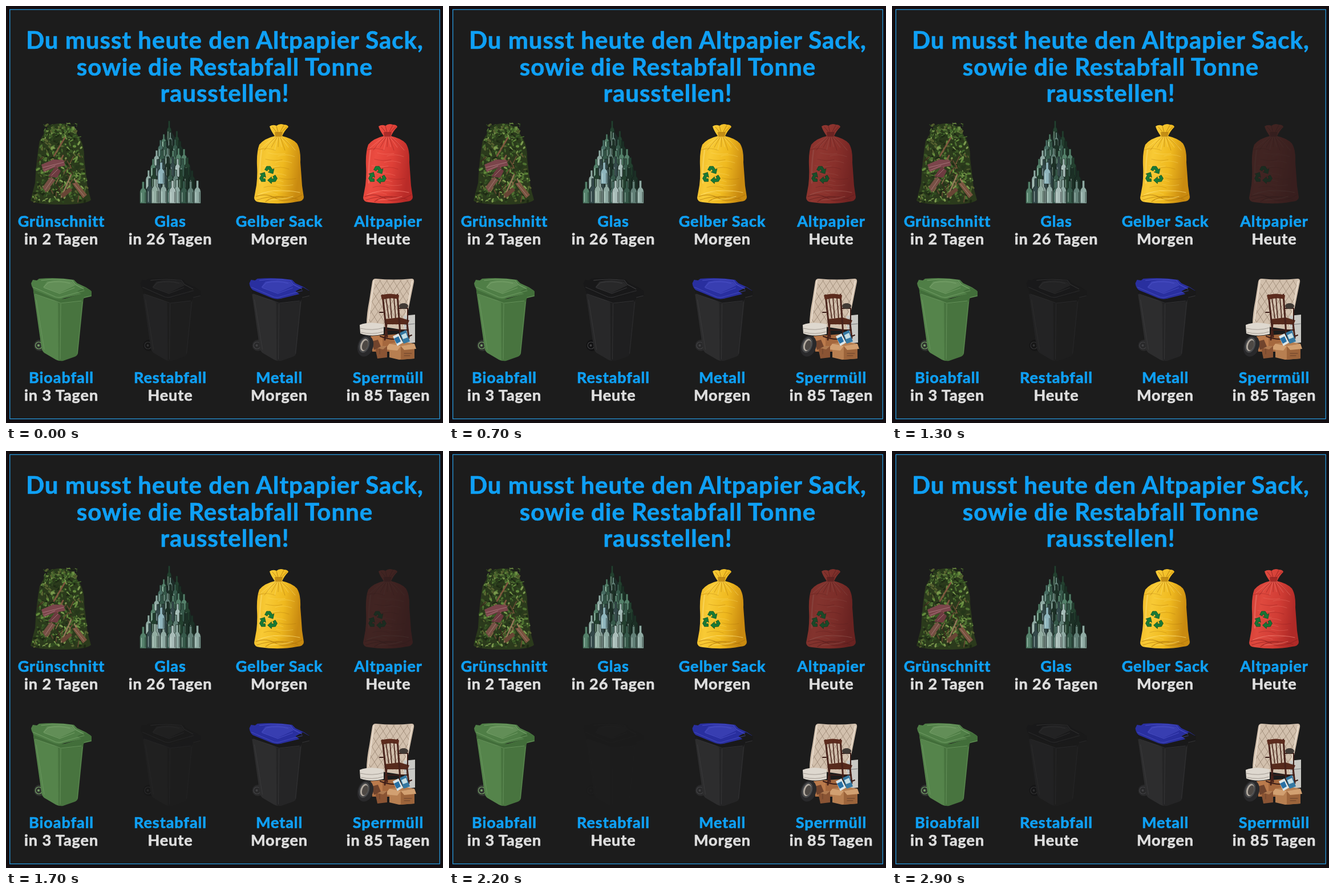
Write an HTML page that moves like this. It is 766 px wide and 731 px high and loops after 3000 ms.

```html
<!DOCTYPE html>
<html lang="de">
<head>
<meta charset="utf-8">
<title>Abfallkalender</title>
<style>
  html, body { margin: 0; width: 100%; height: 100%; overflow: hidden; background: #130e11; }
  svg { display: block; width: 766px; height: 731px; }
  text { font-family: Lato, "Open Sans", sans-serif; font-weight: 700; text-anchor: middle;
         stroke-width: .7; stroke-linejoin: round; }
  .head { font-size: 42px; letter-spacing: 1px; }
  .label { font-size: 27px; letter-spacing: .95px; }
  .blue { fill: #0fa0f5; stroke: #0fa0f5; }
  .pale { fill: #dedede; stroke: #dedede; }
</style>
</head>
<body>
<svg id="stage" viewBox="0 0 766 731" xmlns="http://www.w3.org/2000/svg"></svg>
<script>
const LOOP = 3000, STEP = 100;
const stage = document.getElementById('stage');

let seed = 7;
const rnd = () => (seed = (seed * 16807) % 2147483647) / 2147483647;
const span = (a, b) => a + (b - a) * rnd();
const pick = list => list[Math.floor(rnd() * list.length)];
const n = v => v.toFixed(1);
const path = (d, fill, more = '') => `<path d="${d}" fill="${fill}" ${more}/>`;
const line = (d, color, width, more = '') =>
  `<path d="${d}" fill="none" stroke="${color}" stroke-width="${width}" stroke-linecap="round" stroke-linejoin="round" ${more}/>`;
const text = (x, y, kind, words) => `<text x="${x}" y="${y}" class="${kind}">${words}</text>`;
const group = (x, y, body, id = '') => `<g ${id && `id="${id}"`} transform="translate(${x} ${y})">${body}</g>`;
const gradient = (id, stops, dir) => `<linearGradient id="${id}" ${dir}>` +
  stops.map((c, i) => `<stop offset="${i / (stops.length - 1)}" stop-color="${c}"/>`).join('') + '</linearGradient>';

// Pile of garden cuttings
function cuttings() {
  const half = y => 27 + 27 * Math.pow((y - 206) / 140, .7);
  let s = path('M74 212Q93 200 114 211L124 224Q138 240 137 268Q141 300 143 318L149 340Q140 348 96 348Q52 348 43 341L51 310Q53 270 59 236Z', '#2b3a1c');
  const greens = ['#25361a', '#3c5826', '#4d7030', '#638a3c', '#2f4a20', '#7a994d', '#1d2914', '#55602f', '#44672c'];
  for (let i = 0; i < 430; i++) {
    const y = span(208, 344), x = 96 + span(-1, 1) * half(y) * .93;
    s += `<ellipse cx="${n(x)}" cy="${n(y)}" rx="${n(span(2, 4.5))}" ry="${n(span(.9, 2.2))}" fill="${pick(greens)}" transform="rotate(${n(span(0, 180))} ${n(x)} ${n(y)})"/>`;
  }
  for (let i = 0; i < 36; i++) {
    const x = span(66, 126), y = span(206, 232);
    s += line(`M${n(x)} ${n(y)}l${n(span(-7, 7))} ${n(span(-5, 3))}`, pick(['#4c7030', '#2f4a20', '#66833f']), 1.3);
  }
  for (let i = 0; i < 22; i++) {
    const x = span(60, 130), y = span(255, 335);
    s += line(`M${n(x)} ${n(y)}l${n(span(-9, 9))} ${n(span(5, 13))}`, pick(['#6b4c35', '#8b6a4a', '#3b281d']), 1.5);
  }
  s += line('M103 231L84 263M100 262L84 296', '#805640', 2.6);
  s += line('M114 296L97 335M120 304L128 318', '#96775a', 2.4);
  s += path('M62 278L83 269L101 270L104 280L86 283L66 291Z', '#7b454b');
  s += path('M87 281L96 289L90 301L74 299Z', '#6d3b40');
  s += path('M64 318L77 300L87 305L70 327Z', '#765044');
  s += path('M116 311L124 309L142 331L135 337Z', '#79543f');
  s += path('M96 330L111 318L116 323L100 337Z', '#684535');
  return s + line('M65 283L101 274M67 288L86 280M80 297L91 286M69 322L82 303M120 312L137 333', '#b08383', .8);
}

// Pyramid of bottles
function bottle(x, base, w, h, color) {
  const l = x - w / 2, r = x + w / 2, nk = w * .19, top = base - h;
  return path(`M${n(l)} ${base}V${n(top + h * .48)}Q${n(l)} ${n(top + h * .38)} ${n(x - nk)} ${n(top + h * .3)}V${n(top)}H${n(x + nk)}V${n(top + h * .3)}Q${n(r)} ${n(top + h * .38)} ${n(r)} ${n(top + h * .48)}V${base}Z`,
    color, 'stroke="#17241f" stroke-width=".7"') +
    line(`M${n(l + w * .25)} ${n(base - 3)}V${n(top + h * .52)}`, '#d7e9e3', 1.1, 'opacity=".6"') +
    line(`M${n(r - w * .18)} ${n(base - 2)}V${n(top + h * .5)}`, '#101c18', 1.2, 'opacity=".6"');
}
function bottles() {
  const tones = ['#36594a', '#617f76', '#23402f', '#8faaa3', '#486d63', '#1c3026', '#a5bcb8', '#54806a', '#34494a'];
  let s = path('M283 222L291 222L312 258L327 296L339 345H238L253 294L268 255Z', '#1d2c28');
  const rows = [[238, 1, 8, 34], [251, 3, 8, 29], [266, 5, 9, 31], [284, 6, 10, 33], [300, 8, 9.5, 33], [321, 9, 10, 35], [346, 9, 11.5, 41]];
  for (const [base, count, w, h] of rows) {
    const reach = count === 1 ? 0 : 5 + (base - 234) * .38;
    for (let i = 0; i < count; i++) {
      const x = 288 + (count === 1 ? -2 : (2 * i / (count - 1) - 1) * reach);
      s += bottle(x, base, w, h + span(-3, 3), pick(tones));
    }
  }
  return s + bottle(272, 312, 12, 38, '#8fb5bd') + bottle(261, 346, 12, 43, '#91aca1') + bottle(292, 346, 12, 40, '#a8bcb8');
}

// Tied sack, drawn at the left column position of the yellow one
function sack(fill, dark, light) {
  let s = path('M471 228Q464 218 462 211Q468 207 474 210Q480 205 487 208Q494 208 495 212Q488 219 484 228Q502 232 510 241Q517 252 516 274Q518 300 519 315L522 335Q522 342 510 343Q480 349 445 344Q435 343 435 336L439 314Q441 297 440 280Q439 256 444 243Q453 232 471 228Z', `url(#${fill})`);
  s += path('M471 221H485L483 229H472Z', dark, 'opacity=".65"');
  s += line('M474 210L477 222M487 209L480 222M467 212L475 222M492 212L482 222', dark, 1, 'opacity=".7"');
  for (let i = 0; i < 11; i++) {
    const x = 447 + i * 6;
    s += line(`M${n(478 + (i - 5) * 1.1)} 229Q${n((478 + x) / 2)} 236 ${x} ${n(249 + 4 * Math.sin(i * 2))}`, i % 2 ? dark : light, .9, 'opacity=".55"');
  }
  for (let i = 0; i < 16; i++) {
    const y = 252 + i * 5.5, x = 443 + (i * 17) % 39;
    s += line(`M${x} ${n(y)}q14 ${i % 2 ? 4 : -5} 29 1`, i % 3 ? light : dark, .8, 'opacity=".42"');
  }
  s += line('M448 253Q444 280 445 310', light, 2.5, 'opacity=".45"');
  s += line('M438 334Q456 327 473 337T519 331M440 340Q475 328 512 339M455 343Q468 333 486 335', dark, 1.2, 'opacity=".6"');
  s += line('M442 331Q470 318 515 327M462 340Q486 339 503 334', light, 1.1, 'opacity=".65"');
  const arrow = '<path d="M-6.5 -6L-3.2 -12H3.2L7 -6.2L9.8 -7.8L8 1L-.6 -1.8L2.4 -3.6L0 -7.6L-2.2 -3.8Z" fill="#187a36" stroke="#0c4d23" stroke-width=".7"/>';
  return s + group(460, 297, [0, 120, 240].map(a => `<g transform="rotate(${a}) translate(0 -4)">${arrow}</g>`).join(''));
}

// Wheeled bin in the left column position
function bin(c) {
  let s = `<circle cx="59" cy="595" r="10" fill="${c.wheel}"/><circle cx="57.5" cy="595" r="6" fill="none" stroke="${c.edge}" stroke-width="1.2"/><circle cx="57" cy="595" r="2" fill="${c.edge}"/>`;
  s += path('M48 500L96 514L95 622Q90 622 84 618L67 608Q63 605 62 598Z', c.left);
  s += path('M91 514L136 511L126 609Q125 613 120 615L100 622Q96 623 92 621Z', c.right);
  s += line('M96 519L95 619M53 515L67 602', c.edge, 1, 'opacity=".6"');
  s += line('M134 519L125 609', c.edge, .9, 'opacity=".5"');
  s += path('M47 494L100 514L136 503L150 500V509L137 512L133 518L95 522L83 516L49 505Z', c.rim);
  s += line('M51 505L86 517L96 521L132 517M137 511L149 508', c.edge, 1, 'opacity=".7"');
  s += path('M44 486L47 480L54 481L58 478Q90 475 119 480L125 486L140 493L149 499L136 504L99 513Q92 515 84 512L50 498Q45 494 44 486Z', c.lid);
  s += path('M138 493L150 500V506L136 508L125 500Z', c.rim);
  s += path('M72 483Q94 477 116 483L121 490L94 503L65 493Z', c.shine, 'opacity=".35"');
  s += line('M62 481Q90 477 116 481L121 488L136 496', c.shine, 1.2, 'opacity=".75"');
  s += line('M66 493L74 485Q94 481 112 486M67 494L94 504L120 494', c.shine, 1, 'opacity=".7"');
  return s + line('M48 493L87 510Q94 512 101 509L137 499', c.shine, 1.2, 'opacity=".55"');
}

// Heap of furniture
function furniture() {
  let s = path('M648 478Q680 481 711 478Q716 478 715 484L698 568L632 558Q632 540 637 515L642 483Q643 478 648 478Z', '#d2c0ad');
  s += '<clipPath id="quilt"><path d="M648 480H711L697 561L635 554Z"/></clipPath><g clip-path="url(#quilt)">';
  for (let i = -8; i < 10; i++)
    s += line(`M${640 + i * 12} 476l55 91M${648 + i * 12} 476l-66 91`, '#a08c79', .9);
  s += '</g>' + line('M645 481L635 553M712 482L697 561', '#eee1d2', 1.6);
  s += path('M697 543L717 541V590L699 592Z', '#c9c9c5') + line('M698 559L716 557M702 548V555M702 563V577', '#77787a', 1);
  s += path('M620 559Q638 552 662 558V575Q639 581 621 574Z', '#ded8cf') + line('M621 565Q642 570 662 564M622 572Q642 577 661 571', '#a29a92', 1);
  s += path('M639 579L688 575V606H642Z', '#a5683e') + path('M639 579L660 577V604H642Z', '#bb7b4c');
  // chair
  s += path('M663 549L690 546L707 551L704 558H667Z', '#572a1c');
  s += line('M660 507L668 580M686 506L691 576M667 557L664 585M703 556L706 582', '#48221a', 3);
  s += path('M657 507Q673 502 689 507L688 514Q673 510 659 515Z', '#5c2b1d');
  s += line('M666 512L671 547M673 511L676 547M680 511L683 547', '#4b251b', 1.7);
  s += line('M661 537L655 537M688 530L704 530L704 552M666 568H705M656 579Q682 590 711 577', '#3b1d17', 2);
  s += '<ellipse cx="697" cy="526" rx="8" ry="5" fill="#413a35"/>';
  // cartons, cans and tyre
  s += path('M672 592L693 588L716 592V618L689 620L672 616Z', '#b77f51') + path('M692 596L716 592V618L692 620Z', '#9c643b');
  s += path('M672 592L664 602L686 604L692 596ZM716 592L719 601L698 603L692 596Z', '#d2a071');
  s += path('M678 579L688 574L696 590L686 596Z', '#dce6e8') + path('M680 583L688 579L692 588L685 592Z', '#2770a4');
  s += path('M690 573L701 568L708 588L697 592Z', '#3478a2') + path('M693 577L701 573L704 581L696 584Z', '#c6dee4');
  s += path('M647 599L668 596V616L651 618Z', '#8a5434') + path('M647 599L657 596L668 596L661 602Z', '#b07a50');
  s += line('M655 601V610M698 609H711M698 613H708', '#69402b', 1);
  s += path('M641 588L652 585L657 597L645 603Z', '#71442d');
  s += '<g transform="rotate(18 630 596)"><ellipse cx="630" cy="596" rx="13.5" ry="19" fill="#29292b"/><ellipse cx="627.5" cy="595" rx="9" ry="14" fill="#47484a"/><ellipse cx="627.5" cy="595" rx="6.5" ry="11" fill="#b2aaa0"/><ellipse cx="629" cy="595" rx="5" ry="9" fill="#4d4844"/></g>';
  return s;
}

const green = { left: '#55844b', right: '#48743f', lid: '#4f7e46', rim: '#426e3a', edge: '#76a269', shine: '#83ad76', wheel: '#303330' };
const black = { left: '#29292a', right: '#202021', lid: '#181819', rim: '#19191a', edge: '#424244', shine: '#48484a', wheel: '#121213' };
const blue = { ...black, left: '#2d2d2e', right: '#252526', lid: '#292f9f', shine: '#5359d0', wheel: '#29292a' };

const items = [
  ['Grünschnitt', 'in 2 Tagen'], ['Glas', 'in 26 Tagen'], ['Gelber Sack', 'Morgen'], ['Altpapier', 'Heute'],
  ['Bioabfall', 'in 3 Tagen'], ['Restabfall', 'Heute'], ['Metall', 'Morgen'], ['Sperrmüll', 'in 85 Tagen']
];
const side = 'x1="0" x2="1" y1="0" y2=".25"';

stage.innerHTML =
  '<defs>' + gradient('yellow', ['#e9b120', '#f8ca35', '#efb91f', '#c98a10'], side) +
  gradient('red', ['#d93c33', '#ec4c41', '#de4037', '#b92b28'], side) + '</defs>' +
  '<rect width="766" height="731" fill="#130e11"/>' +
  '<rect x="6.7" y="6.3" width="753.6" height="717.4" fill="#1c1c1c" stroke="#268fce" stroke-width="1.4"/>' +
  ['Du musst heute den Altpapier Sack,', 'sowie die Restabfall Tonne', 'rausstellen!']
    .map((t, i) => text(383.5, 75 + i * 46.7, 'head blue', t)).join('') +
  items.map(([name, due], i) => {
    const x = 97 + (i % 4) * 191, y = i < 4 ? 387 : 661;
    return text(x, y, 'label blue', name) + text(x, y + 31, 'label pale', due);
  }).join('') +
  cuttings() + bottles() +
  sack('yellow', '#a9710b', '#ffe47d') +
  group(191, 0, sack('red', '#8d1d1d', '#ff8a7d'), 'paper') +
  bin(green) + group(191.5, 0, bin(black), 'rest') + group(382.5, 0, bin(blue)) +
  furniture();

const paper = document.getElementById('paper');
const rest = document.getElementById('rest');

// Linear fade out and back in, brightest at the given time
function pulse(t, peak) {
  const p = ((t - peak + LOOP) % LOOP) / LOOP;
  return .05 + .95 * Math.abs(1 - 2 * p);
}
function draw(now) {
  const t = Math.floor((now % LOOP) / STEP) * STEP;
  paper.setAttribute('opacity', pulse(t, 0));
  rest.setAttribute('opacity', pulse(t, 650));
}
const start = performance.now();
function tick() {
  draw(performance.now() - start);
  requestAnimationFrame(tick);
}
tick();
</script>
</body>
</html>
```
